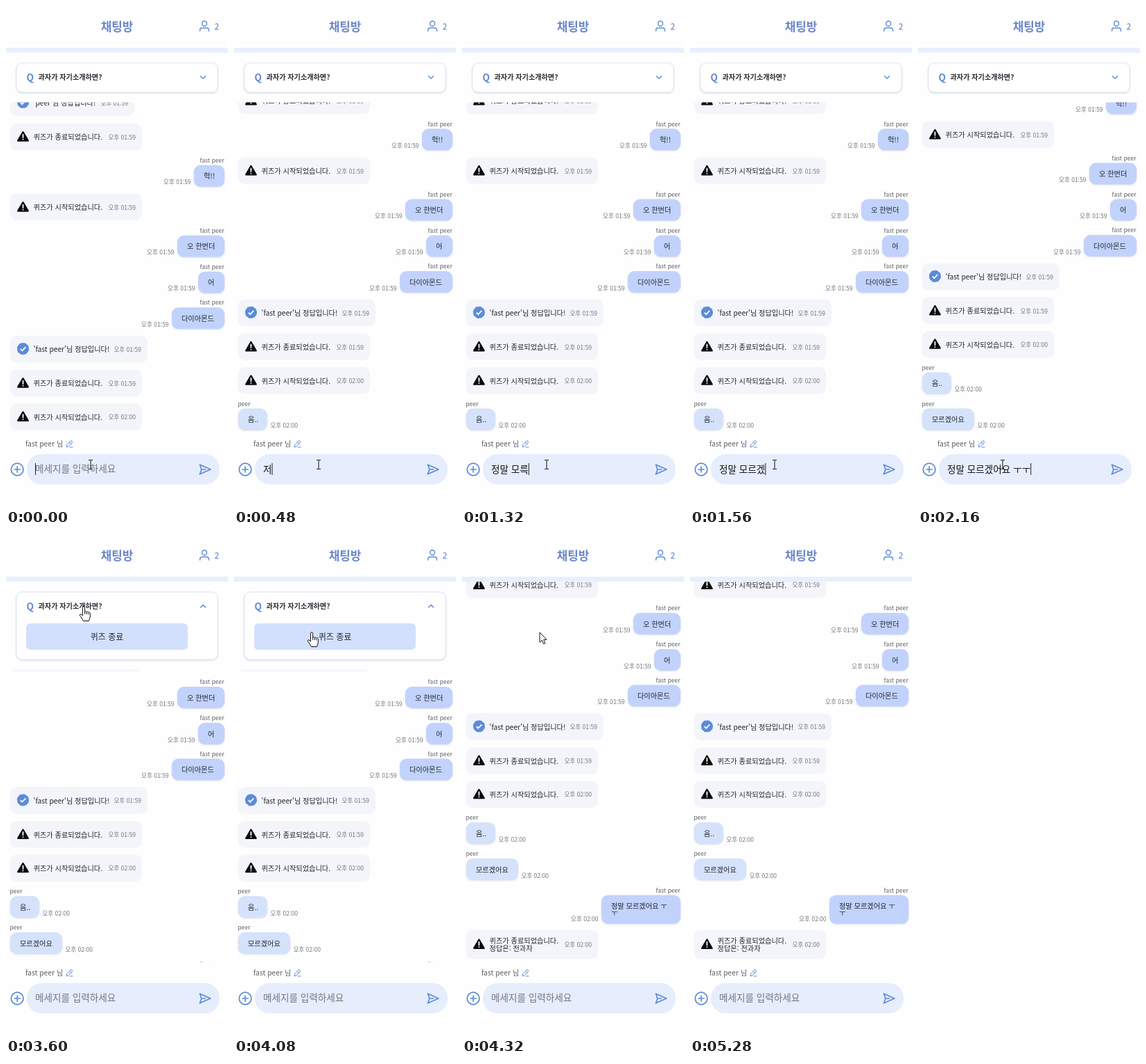
These frames come from a looping animation (320x720 px, 5760 ms). An HTML page:

```html
<!DOCTYPE html>
<html lang="ko">
<head>
<meta charset="utf-8">
<title>채팅방</title>
<style>
html, body { margin: 0; width: 100%; height: 100%; overflow: hidden; background: #fefefe; }
svg { display: block; width: 320px; height: 720px; }
text { font-family: "Noto Sans CJK KR", "Noto Sans CJK", "Noto Sans", sans-serif; white-space: pre; }
.msg { font-size: 10.2px; font-weight: 500; fill: #22242a; }
.name { font-size: 8.56px; fill: #5e6168; }
.time { font-size: 8.56px; fill: #73767d; }
.line { fill: none; stroke: #5d8ad6; stroke-linecap: round; stroke-linejoin: round; }
.shadow { filter: drop-shadow(0 1.5px 1.2px rgba(60, 75, 120, .2)); }
.pointer { fill: #fff; stroke: #111; stroke-width: 1; stroke-linejoin: round; }
</style>
</head>
<body>
<svg viewBox="0 0 320 720" xmlns="http://www.w3.org/2000/svg">
  <defs>
    <clipPath id="clip"><rect id="view" width="320"/></clipPath>
    <g id="warn">
      <path d="M0-6.2 7.2 6H-7.2Z" stroke="#0c0c0e" stroke-width="2.4" stroke-linejoin="round" fill="#0c0c0e"/>
      <path d="M0-2.8V1.6M0 4.3v.1" stroke="#fff" stroke-width="1.8" stroke-linecap="round"/>
    </g>
    <g id="check">
      <circle r="7.9" fill="#5c8bd9"/>
      <circle r="7.6" fill="none" stroke="#5c8bd9" stroke-width="2" stroke-dasharray="3.7 2.27" stroke-linecap="round"/>
      <path d="M-3.7.2-1.2 2.8 3.9-2.5" fill="none" stroke="#fff" stroke-width="1.7"/>
    </g>
  </defs>
  <rect width="320" height="720" fill="#fefefe"/>

  <g clip-path="url(#clip)"><g id="list"></g></g>

  <rect y="60" width="320" height="7" fill="#e8effd"/>
  <text x="160" y="36" text-anchor="middle" font-size="16.9" font-weight="700" fill="#6a86ca">채팅방</text>
  <g class="line" stroke-width="1.4">
    <circle cx="286" cy="25.3" r="3.5"/>
    <path d="M279.6 36v-1.2a3.3 3.3 0 0 1 3.3-3.3h6.2a3.3 3.3 0 0 1 3.3 3.3V36"/>
  </g>
  <text x="300.6" y="34.2" font-size="12" font-weight="500" fill="#5d7fc8">2</text>

  <g id="panel">
    <rect id="card" class="shadow" x="15" y="82" width="290" rx="8" fill="#fff" stroke="#e1e5ef"/>
    <text x="29.5" y="108" font-size="13.7" font-weight="700" fill="#6488d2">Q</text>
    <text x="46.5" y="106.3" font-size="10.15" font-weight="600" fill="#2a2c33">과자가 자기소개하면?</text>
    <path id="chevron" class="line" stroke-width="1.5"/>
    <g id="finish">
      <rect x="29" y="127" width="233" height="38" rx="6" fill="#d3e0fd"/>
      <text x="145.5" y="150.6" text-anchor="middle" font-size="12" font-weight="500" fill="#22242a">퀴즈 종료</text>
    </g>
  </g>

  <text x="28" y="632.8" font-size="10.27" font-weight="500" fill="#5a5d66">fast peer 님</text>
  <path class="line" stroke-width="1" d="M87.2 633.6l.5-2.9 5.2-5.3a1.5 1.5 0 0 1 2.3 2.2l-5.2 5.3ZM91.6 626.8l2.2 2.2M92 634h4"/>
  <rect x="30" y="644" width="278" height="43.5" rx="21" fill="#e6eefd"/>
  <g class="line" stroke-width="1.7">
    <circle cx="16.2" cy="666" r="8.8"/>
    <path d="M16.2 662v8M12.2 666h8"/>
    <path d="M279.4 659.2 294.8 666 279.4 672.8 281.8 666ZM282 666h5.5"/>
  </g>
  <text id="entry" x="42" font-size="13.6"></text>
  <rect id="caret" y="657" width="1" height="17" fill="#222"/>

  <g id="beam" fill="none" stroke="#222" stroke-width="1.1"><path d="M-3-6.5h2L0-5.7 1-6.5h2M0-5.7V5.7M-3 6.5h2L0 5.7 1 6.5h2"/></g>
  <path id="arrow" class="pointer" d="M0 0V14.2L3.3 11.2 5.7 16.6 8 15.6 5.7 10.3H10Z"/>
  <path id="hand" class="pointer" d="M-1.6 1.4a1.6 1.6 0 0 1 3.2 0V7.4a1.5 1.5 0 0 1 2.7.3 1.5 1.5 0 0 1 2.6.7 1.4 1.4 0 0 1 2.4 1V15L7.4 20.5H-.6L-4.7 13.6a1.5 1.5 0 0 1 .5-2.9l2.6 2.2ZM1.6 7.4v3.4M4.3 8v3M6.9 9v2.4"/>
</svg>
<script>
const $ = id => document.getElementById(id);
const STEP = 120, LOOP = 5760, LAST = 44;

function label(cls, x, cy, str, end) {
  const drop = { msg: 3.8, name: 2.9, time: 3.2 }[cls];
  return `<text class="${cls}" x="${x}" y="${cy + drop}"${end ? ' text-anchor="end"' : ''}>${str}</text>`;
}

// Notice box; y is the top edge
function notice(y, icon, w, lines, time) {
  const h = lines.length > 1 ? 41 : 38.5, mid = y + h / 2;
  return `<rect x="6" y="${y}" width="${w}" height="${h}" rx="9" fill="#f3f5fb"/>` +
    `<use href="#${icon}" x="24.5" y="${mid - 0.6}"/>` +
    lines.map((s, i) => label('msg', 39.6, mid + 0.5 + (i - (lines.length - 1) / 2) * 10.4, s)).join('') +
    label('time', w - 3.5 - 39, mid + 0.5, time);
}

// Chat bubble; y is the middle of the name above it
function bubble(y, mine, w, lines, time) {
  const h = lines.length > 1 ? 41 : 30.7, x = mine ? 315 - w : 6, top = y + 6.8, mid = top + h / 2;
  return label('name', mine ? 314.5 : 5.5, y, mine ? 'fast peer' : 'peer', mine) +
    `<rect class="shadow" x="${x}" y="${top}" width="${w}" height="${h}" rx="9.5" fill="${mine ? '#c1d2fc' : '#d5e2fc'}"/>` +
    lines.map((s, i) => label('msg', x + 14, mid + 0.3 + (i - (lines.length - 1) / 2) * 10.6, s)).join('') +
    label('time', mine ? x - 4.5 : x + w + 4.5, top + h - 6.4, time, mine);
}

const ended = '퀴즈가 종료되었습니다.', begun = '퀴즈가 시작되었습니다.';
const early = '오후 01:59', late = '오후 02:00';
$('list').innerHTML = [
  notice(119.7, 'check', 179, ["'peer'님 정답입니다!"], early),
  notice(168.8, 'warn', 190, [ended], early),
  bubble(222, true, 44, ['헉!!'], early),
  notice(269.8, 'warn', 190, [begun], early),
  bubble(323, true, 68, ['오 한번더'], early),
  bubble(375, true, 38, ['어'], early),
  bubble(426.5, true, 76, ['다이아몬드'], early),
  notice(473.9, 'check', 198, ["'fast peer'님 정답입니다!"], early),
  notice(522.8, 'warn', 190, [ended], early),
  notice(571.2, 'warn', 190, [begun], late),
  bubble(624, false, 42, ['음..'], late),
  bubble(676, false, 75, ['모르겠어요'], late),
  bubble(728.4, true, 114, ['정말 모르겠어요 ㅜ', 'ㅜ'], late),
  notice(785.6, 'warn', 190, [ended, '정답은: 전과자'], late)
].join('');

const HEAD = '정말 ', MID = HEAD + '모르', FULL = MID + '겠어요';
const strokes = ['', 'ㅈ', '저', '정', '정ㅁ', '정마', '정말', HEAD, HEAD + 'ㅁ', HEAD + '모', HEAD + '몰', MID,
  HEAD + '모륵', MID + '게', MID + '겠', MID + '겠ㅇ', MID + '겠어', MID + '겠엉', FULL, FULL + ' ', FULL + ' ㅜ', FULL + ' ㅜㅜ'];

const SEND = 20, OPEN = 29, CLOSE = 36, LEAVE = 40;
// [step, list offset]
const scroll = [[0, 0], [4, -52.2], [14, -104.2], [SEND, -166.7], [OPEN, -111.7], [CLOSE, -217.7]];
// [step, x, y] of the pointer tip
const track = [[0, 122, 659], [25, 122, 659], [28, 112, 103], [31, 112, 103], [34, 112, 140], [LAST, 112, 140]];

function tip(k) {
  const i = track.findIndex((p, n) => n && k <= p[0]);
  const [a, b] = [track[i - 1], track[i]];
  const u = (k - a[0]) / (b[0] - a[0]), e = u * u * (3 - 2 * u);
  return [a[1] + (b[1] - a[1]) * e, a[2] + (b[2] - a[2]) * e];
}

function show(id, on) { $(id).style.display = on ? '' : 'none'; }

function draw(ms) {
  const k = Math.min(LAST, Math.floor((ms % LOOP) / STEP));
  const open = k >= OPEN && k < CLOSE, closed = k >= CLOSE;

  const top = closed ? 67 : open ? 193.5 : 138.5;
  $('view').setAttribute('y', top);
  $('view').setAttribute('height', 614 - top);
  $('list').setAttribute('transform', `translate(0 ${scroll.filter(s => s[0] <= k).pop()[1]})`);

  show('panel', !closed);
  show('finish', open);
  $('card').setAttribute('height', open ? 97 : 42);
  $('chevron').setAttribute('d', open ? 'M280.5 104l3.5-3.5 3.5 3.5' : 'M280.5 100.7l3.5 3.5 3.5-3.5');

  const n = Math.max(0, Math.min(strokes.length - 1, Math.floor((k - 2) * 4 / 3)));
  const typed = k < SEND ? strokes[n] : '';
  const entry = $('entry');
  entry.textContent = typed || '메세지를 입력하세요';
  entry.setAttribute('y', typed ? 671.4 : 670);
  entry.setAttribute('fill', typed ? '#111216' : '#72767f');
  show('caret', k < SEND + 4);
  $('caret').setAttribute('x', 42 + (typed ? entry.getComputedTextLength() : 0));

  const [x, y] = tip(k);
  const kind = y > 640 ? 'beam' : !closed && y < (open ? 180 : 125) ? 'hand' : 'arrow';
  for (const id of ['beam', 'arrow', 'hand']) {
    show(id, id === kind && k < LEAVE);
    $(id).setAttribute('transform', `translate(${x} ${y})`);
  }
}

function tick() {
  draw(performance.now());
  requestAnimationFrame(tick);
}
tick();
</script>
</body>
</html>
```
